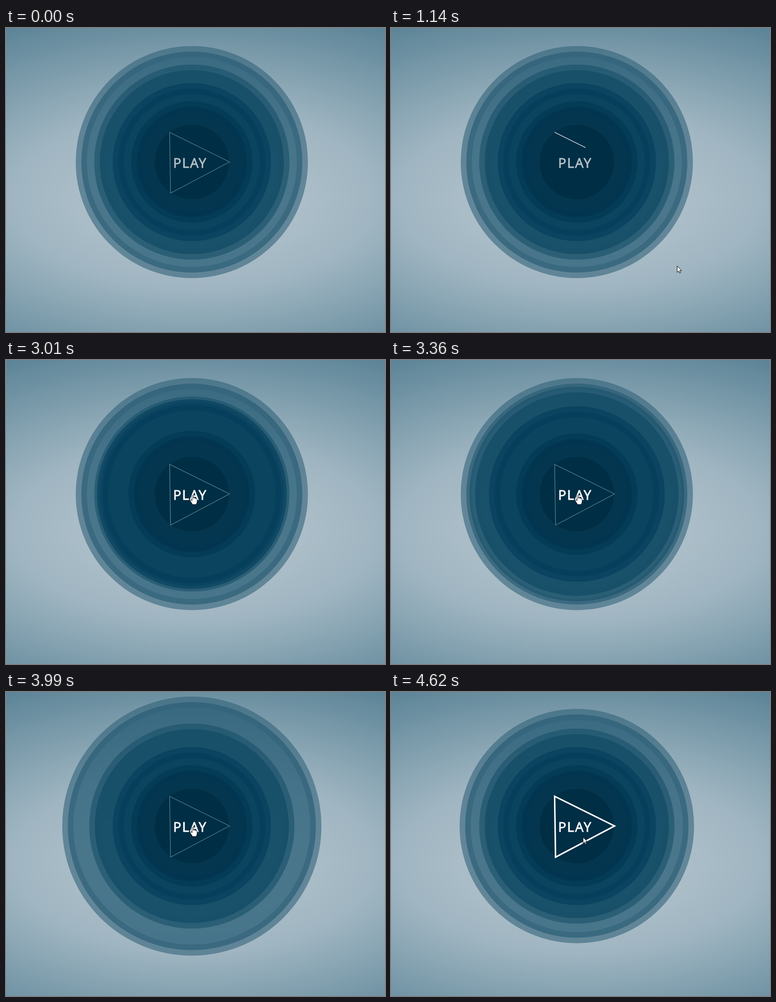
Recreate the animation shown at these times as an HTML page. Size 835x670 px, loop 4690 ms.

```html
<!DOCTYPE html>
<html lang="en">
<head>
<meta charset="utf-8">
<title>Play button</title>
<style>
  html, body { margin: 0; width: 100%; height: 100%; overflow: hidden; }
  body { background: radial-gradient(900px 446px at 417px 376px, #bccad2, #9fb5c1 45%, #568093); }
  svg { display: block; width: 835px; height: 670px; }
  .ring { stroke-width: 24.5; stroke-opacity: .6; }
  #tri { fill: none; stroke-miterlimit: 10; }
  #label {
    font: 29.5px "Open Sans", "Noto Sans", sans-serif;
    letter-spacing: 2.1px;
    fill: #fff;
    stroke: #fff;
    stroke-width: .9px;
  }
</style>
</head>
<body>
<svg viewBox="0 0 835 670">
  <g id="rings"></g>
  <circle id="core" cx="409.4" cy="295.5" r="82" fill="#002e45"/>
  <path id="tri"/>
  <text id="label" x="368.2" y="308.2">PLAY</text>
  <g id="cursor" stroke="#000" fill="#fff">
    <path id="arrow" d="M.5 .5V14.5L3.7 11.5L5.8 16.2L8 15.2L6 10.6H10Z"/>
    <path id="hand" stroke-width=".9" d="M-1.6 1.6C-1.6-.4 1.4-.4 1.4 1.6V6.5C2-.1 4.4 5.3 4.4 6.8C5 5.6 7 5.8 7.2 7.3C8 6.4 9.6 7 9.6 8.5V13C9.6 16 8 17 8 19.8H-1C-1 17.5-5.6 13-5.6 11.2C-5.6 9-3 9.4-1.6 11.8Z"/>
  </g>
</svg>
<script>
  const LOOP = 4690, TRI_LOOP = 4120, DRAW_AT = 510;
  const BEAT = 522, FIRST_BEAT = 2042, GAP = 40.7;
  const $ = id => document.getElementById(id);
  const clamp = x => Math.min(1, Math.max(0, x));
  const mix = (a, b, k) => a + (b - a) * k;
  const span = (t, from, to) => clamp((t - from) / (to - from));
  const easeOut = (k, power) => 1 - (1 - k) ** power;

  // Linear rise and fall
  const pulse = (t, start, half) => Math.max(0, 1 - Math.abs(t - start - half) / half);

  // Stroke and fill, from the outside in
  const shades = [
    ['#32637a', '#1b546f'], ['#185169', '#144d66'],
    ['#023d5b', '#09435e'], ['#003652', '#04364e']
  ];
  const rings = shades.map(([stroke, fill], i) => {
    const el = document.createElementNS('http://www.w3.org/2000/svg', 'circle');
    const rank = shades.length - 1 - i;
    const r = 121.4 + GAP * rank;
    const attrs = {
      class: 'ring', cx: 409.4, cy: 295.5, r, stroke, fill,
      'fill-opacity': i ? .9 : .68
    };
    for (const k in attrs) el.setAttribute(k, attrs[k]);
    $('rings').append(el);
    return { el, r, start: FIRST_BEAT + BEAT * rank };
  });

  // Constant speed with soft ends, each taking share a
  function softLinear(s, a) {
    const n = 2 * a * (1 - a);
    if (s < a) return s * s / n;
    if (s > 1 - a) return 1 - (1 - s) ** 2 / n;
    return (s - a / 2) / (1 - a);
  }

  const corners = [[360.5, 229.9], [492.5, 295.2], [362.5, 364]];
  const sides = corners.map(([x, y], i) => {
    const [nx, ny] = corners[(i + 1) % 3];
    return Math.hypot(nx - x, ny - y);
  });
  const total = sides.reduce((a, b) => a + b);

  function outline(part) {
    if (part > .999) return 'M' + corners.join('L') + 'Z';
    let left = part * total, d = 'M' + corners[0];
    for (let i = 0; i < 3 && left > 0; i++) {
      const k = Math.min(1, left / sides[i]), a = corners[i], b = corners[(i + 1) % 3];
      d += 'L' + [mix(a[0], b[0], k), mix(a[1], b[1], k)];
      left -= sides[i];
    }
    return d;
  }

  // Swells to thick white, then is drawn anew while it thins and dims
  function drawTriangle(t) {
    const p = t % TRI_LOOP, drawing = p > DRAW_AT;
    const part = drawing ? softLinear(span(p, 500, 3055), .226) : 1;
    const swell = drawing ? (1 - span(p, DRAW_AT, 1610)) ** 2 : p / DRAW_AT;
    const glow = drawing ? (1 - span(p, DRAW_AT, 3640)) ** 1.5 : easeOut(p / DRAW_AT, 4);
    const rgb = [108, 156, 172].map(c => Math.round(mix(c, 255, glow)));
    $('tri').setAttribute('d', outline(part));
    $('tri').setAttribute('stroke-width', 1 + 2.3 * swell);
    $('tri').setAttribute('stroke', `rgb(${rgb})`);
  }

  // Enters, waits, glides to the label, leaves
  function drawCursor(t) {
    const enter = 1 - easeOut(span(t, 180, 700), 2);
    const glide = span(t, 1140, 2550);
    const leave = span(t, 4415, LOOP);
    const x = mix(630, 411.5, easeOut(glide, 1.6)) + 190 * enter + 15 * leave;
    const y = mix(524, 298.5, easeOut(glide, 2.2)) + 216 * enter + 28 * leave;
    const over = x < 445 && y < 313;
    $('cursor').setAttribute('transform', `translate(${x} ${y})`);
    $('arrow').style.display = over ? 'none' : '';
    $('hand').style.display = over ? '' : 'none';
  }

  function draw(now) {
    const t = now % LOOP;
    for (const { el, r, start } of rings) el.setAttribute('r', r + GAP * pulse(t, start, BEAT));
    $('core').setAttribute('r', 82 - 15 * pulse(t, FIRST_BEAT, BEAT / 2));
    $('label').setAttribute('opacity', mix(.7, 1, span(t, 2100, 2900)));
    drawTriangle(t);
    drawCursor(t);
  }

  let begin;
  function tick(now) {
    begin ??= now;
    draw(now - begin);
    requestAnimationFrame(tick);
  }
  draw(0);
  requestAnimationFrame(tick);
</script>
</body>
</html>
```
